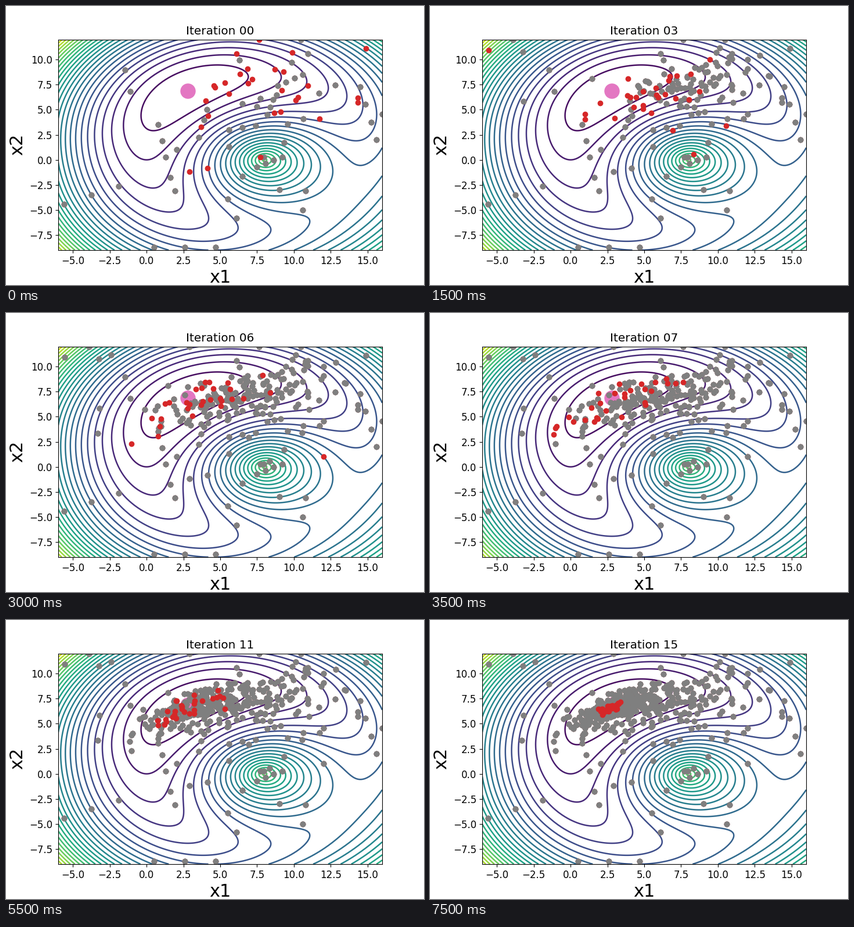
Recreate the animation shown at these times as a matplotlib script. Size 720 by 480 pixels, loop 8 s.

```python
import numpy as np
import matplotlib.pyplot as plt
from matplotlib.animation import FuncAnimation

plt.rcParams.update({"font.family": "DejaVu Sans", "font.size": 12})

STEPS = 16
SIZE = 29  # points per generation
XLIM, YLIM = (-6, 16), (-9, 12)
RED, GRAY, PINK = "tab:red", "tab:gray", "tab:pink"


def energy(x, y):
    """Potential energy of a mass held by two springs."""
    left = np.hypot(12 + x, y) - 12
    right = np.hypot(8 - x, y) - 8
    return 0.5 * left**2 + 5 * right**2 - 7 * y


def cloud(rng, n, center, spread, slope):
    """Normal cloud along a slanted line, held inside the axes."""
    u, v = rng.normal(size=(2, n)).clip(-2, 2)
    dx = spread[0] * u
    x, y = center[0] + dx, center[1] + slope * dx + spread[1] * v
    return np.column_stack([x.clip(*XLIM), y.clip(*YLIM)])


def chain(start, end, n):
    return np.linspace(start, end, n)


def starting_points():
    """Already visited points: a few short chains and a wide cloud."""
    return np.vstack([
        chain((8.9, 7.4), (10.6, 8.5), 4),
        chain((14.5, 7.3), (15.6, 2), 4),
        chain((8.6, 6), (8.2, 4.5), 3),
        chain((7.4, 3.4), (5.6, 3), 3),
        chain((0.8, 3.5), (1.3, 0.3), 3),
        chain((7.5, -0.7), (9.2, 0.3), 4),
        chain((-5.6, -4.4), (-1.9, -2.6), 3),
        chain((5.5, -3.9), (6.1, -5.8), 2),
        chain((10.8, -3.1), (10.6, -5), 2),
        chain((0.5, -8.7), (4.7, -8.7), 3),
        cloud(np.random.default_rng(7), 26, (9, 6), (5.5, 4.5), 0.3),
    ])


def generation(k):
    """Cloud that drifts along the valley and shrinks to the minimum."""
    rng = np.random.default_rng(40 + k)
    if k == 0:
        return cloud(rng, SIZE, (8.5, 6.5), (4.2, 3), 0.3)
    lost = max(0, 7 - k)  # points that land far from the cloud
    strays = rng.uniform((XLIM[0], 0), (XLIM[1], 13), (lost, 2)).clip(-9, YLIM[1])
    center = (2.6 + 6.2 * np.exp((1 - k) / 3), 6.5 + 1.2 * np.exp((1 - k) / 1.5))
    spread = (min(2.4, 0.24 * (16.6 - k)), min(1.1, 0.1 * (16.8 - k)))
    return np.vstack([strays, cloud(rng, SIZE - lost, center, spread, 0.45)])


start = starting_points()
gens = [generation(k) for k in range(STEPS)]

fig = plt.figure(figsize=(7.2, 4.8), dpi=100)
ax = fig.add_axes([0.125, 0.125, 0.775, 0.755])
gx, gy = np.meshgrid(np.linspace(*XLIM, 200), np.linspace(*YLIM, 200))
ax.contour(gx, gy, energy(gx, gy), levels=np.arange(-40, 481, 20),
           linewidths=1.8)
ax.plot(2.7852, 6.8996, "o", color=PINK, markersize=18)

# visited points are painted several times, which hardens their edges
visited = [ax.plot([], [], "o", color=c)[0] for c in (RED, GRAY, GRAY, GRAY)]
current, = ax.plot([], [], "o", color=RED)

ax.set(xlim=XLIM, ylim=YLIM,
       xticks=np.arange(-5, 15.1, 2.5), yticks=np.arange(-7.5, 10.1, 2.5))
ax.set_xlabel("x1", fontsize=22)
ax.set_ylabel("x2", fontsize=22)
title = ax.set_title("")


def draw(k):
    past = np.vstack([start, *gens[:k]])
    for dots in visited:
        dots.set_data(*past.T)
    current.set_data(*gens[k].T)
    title.set_text(f"Iteration {k:02d}")
    return [*visited, current, title]


anim = FuncAnimation(fig, draw, frames=STEPS, interval=500,
                     repeat=True, repeat_delay=0)
plt.show()
```
